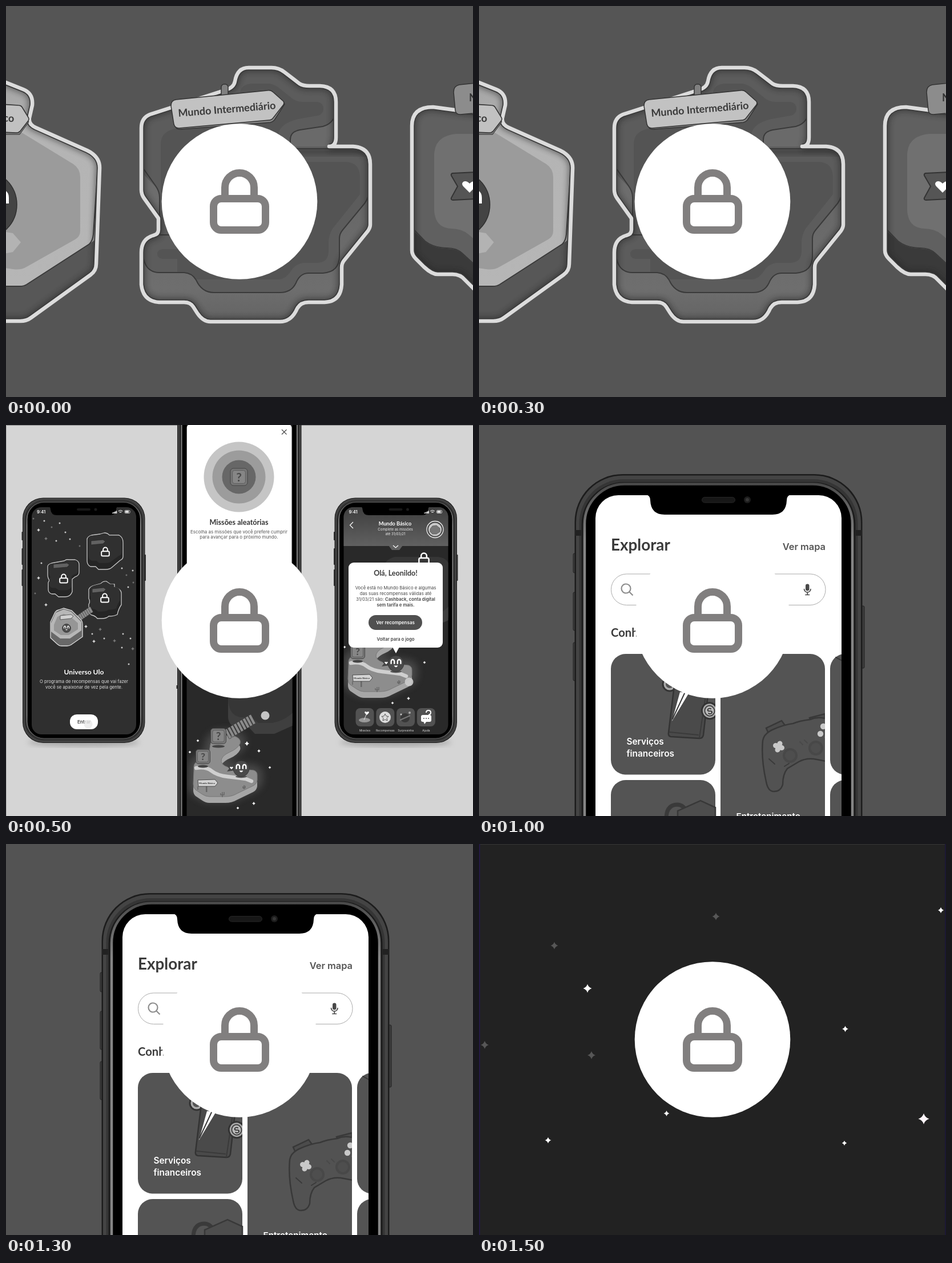
These frames come from a looping animation (818x685 px, 2 s). An HTML page:

```html
<!DOCTYPE html>
<html lang="pt-BR">
<head>
<meta charset="utf-8">
<title>Mundos</title>
<style>
html, body { margin: 0; width: 100%; height: 100%; overflow: hidden; background: #555; }
svg { display: block; width: 818px; height: 685px; }
text { font-family: Inter, "Liberation Sans", sans-serif; }
.h { font-family: Lato, "Open Sans", sans-serif; font-weight: 700; }
.b { font-weight: 600; }
.m { text-anchor: middle; }
.line { fill: none; stroke: #3a3a3a; stroke-width: 2; stroke-linejoin: round; stroke-linecap: round; }
</style>
</head>
<body>
<svg id="stage" viewBox="0 0 818 685" xmlns="http://www.w3.org/2000/svg"></svg>
<script>
const STEP = 500;
const stage = document.getElementById('stage');

const rect = (x, y, w, h, r, fill, more = '') =>
  `<rect x="${x}" y="${y}" width="${w}" height="${h}" rx="${r}" fill="${fill}" ${more}/>`;
const disc = (x, y, r, fill, more = '') => `<circle cx="${x}" cy="${y}" r="${r}" fill="${fill}" ${more}/>`;
const path = (d, fill, more = '') => `<path d="${d}" fill="${fill}" ${more}/>`;
const line = (d, more = '') => `<path class="line" d="${d}" ${more}/>`;
const text = (x, y, size, fill, cls, s, more = '') =>
  `<text x="${x}" y="${y}" font-size="${size}" fill="${fill}" class="${cls}" ${more}>${s}</text>`;

function star(x, y, r, fill) {
  const c = r * 0.24;
  return path(`M${x},${y - r}Q${x + c},${y - c} ${x + r},${y}Q${x + c},${y + c} ${x},${y + r}` +
    `Q${x - c},${y + c} ${x - r},${y}Q${x - c},${y - c} ${x},${y - r}Z`, fill);
}
const stars = (list, fill) => list.map(([x, y, r]) => star(x, y, r, fill)).join('');

const lock = (x, y, k, color) =>
  `<g transform="translate(${x} ${y}) scale(${k})" fill="none" stroke="${color}" stroke-width="13">` +
  `<path d="M-25.5,-5V-24.5a25.5,25.5 0 0 1 51,0V-5"/><rect x="-45.5" y="-5" width="91" height="55" rx="13.5"/></g>`;

const heart = (x, y, s, fill) =>
  `<path transform="translate(${x} ${y}) scale(${s})" fill="${fill}" d="M0,10L-11,-1Q-15,-6 -11,-9Q-6,-12 0,-6Q6,-12 11,-9Q15,-6 11,-1Z"/>`;

// Large island: a light rim, a dark inner line and a soft inner shade.
const island = (id, d, fill, inside) => `
  <clipPath id="${id}"><path d="${d}"/></clipPath>
  <g clip-path="url(#${id})">${path(d, fill)}${inside}
    <path d="${d}" fill="none" stroke="#222" stroke-width="16" opacity=".45" filter="url(#soft)"/>
    <path d="${d}" fill="none" stroke="#3a3a3a" stroke-width="10"/></g>
  <path d="${d}" fill="none" stroke="#dcdcdc" stroke-width="6.5" stroke-linejoin="round"/>`;

function worlds() {
  const mid = 'M237,322V214Q237,196 252,190L385,147Q399,143 401,132Q405,108 425,108H465Q478,108 488,116L514,136Q520,140 532,140H550' +
    'Q578,141 578,168V230Q578,246 566,246H608Q638,248 638,277V383Q638,388 634,394L592,446Q588,451 588,458V488Q586,518 558,519H530' +
    'Q516,519 510,530Q500,553 480,553H358Q345,553 335,538L328,527Q323,519 312,519H268Q240,517 237,488V432Q237,408 258,402' +
    'Q267,400 267,392V372L242,337Q237,330 237,322Z';
  const left = 'M-20,128L0,134L30,146Q48,153 46,174L41,196Q39,207 52,213L142,253Q165,264 164,285L158,452Q158,464 148,471L44,546Q36,552 25,552H-20Z';
  const right = 'M840,188L800,184L748,177Q711,177 711,210V428Q711,436 718,443L732,457Q746,470 756,470H782Q796,470 804,480L840,516V188Z';
  const midTop = 'M240,432Q241,466 268,467H312Q326,468 333,480Q343,502 364,502H480Q500,502 508,485Q515,468 530,468H555Q584,466 584,438' +
    'V407Q584,399 590,392L628,346Q636,336 636,318';
  const midIn = `
    ${path('M230,283L262,317Q269,325 269,335V380L230,330Z', '#6d6d6d')}
    ${path('M578,180Q577,205 555,211L515,217Q498,220 498,236V250H578Z', '#6a6a6a')}
    ${line('M230,270L262,315Q269,325 269,335V395')}${line('M578,180Q577,205 555,211L515,217Q498,220 498,234V250')}
    <rect x="480" y="249" width="170" height="12" fill="#333" opacity=".5" filter="url(#soft)"/>
    ${line('M500,250H620')}
    ${path('M271,340V242Q271,222 292,216L410,180V150Q414,136 432,136H462Q472,138 480,145L500,161Q508,168 520,168H546Q556,170 556,180Q556,192 540,193L512,198Q485,204 478,220L470,330Z', '#545454')}
    ${path('M480,273H596Q620,275 620,300V330L572,390Q565,402 565,415V430Q565,449 545,450H520Q506,452 498,466Q490,478 478,479H300V443H274Q265,442 265,434Q265,427 274,426H480Z', '#545454')}
    ${path(midTop + 'L660,320V570H230V432Z', 'url(#wall)')}${line(midTop)}
    ${line('M241,424Q247,402 268,401H300')}`;
  const leftIn = `
    ${path('M-20,120L60,130V200L170,250L162,395Q160,408 150,414L36,488Q31,491 24,491H-20Z', 'url(#sand)')}
    ${path('M-20,215L28,222L118,277Q130,285 130,300V394Q130,404 121,409L36,457Q26,463 12,461L-20,456Z', '#9b9b9b')}
    ${path('M-20,396H0L12,398L26,414L12,431L-20,437Z', '#b3b3b3')}
    ${line('M161,280L153,400Q152,411 146,417L36,488Q31,491 24,491H-20')}`;
  const rightIn = `
    ${path('M840,224H788Q750,228 750,262V358Q752,389 780,390Q798,390 810,400L840,425Z', '#707070')}
    ${path('M705,385L734,413Q750,425 772,425Q790,425 800,435L840,472V530H700Z', '#3a3a3a')}
    ${line('M705,382L734,412Q750,424 772,424Q790,424 800,434L840,471')}`;
  return rect(0, 0, 818, 685, 0, '#555') +
    island('cl', left, '#575757', leftIn) +
    disc(-41, 348, 60, '#444', 'stroke="#2f2f2f" stroke-width="1.5"') +
    path('M-20,346V334Q-20,322 -7,322Q5,323 5,336V346H0V341Q0,334 -8,334V346Z', '#fff') +
    path('M-10,180L26,181L40,203L24,225H-10Z', '#777', 'stroke="#333"') +
    path('M-10,172L22,174Q26,174 28,177L39,195Q41,198 39,201L25,219Q22,222 18,222L-10,221Z', '#c1c1c1', 'stroke="#333" stroke-width="1.5"') +
    text(14, 203, 18, '#3a3a3a', 'h', 'Mundo Básico', 'text-anchor="end" transform="rotate(2 14 203)"') +
    island('cr', right, '#606060', rightIn) +
    path('M840,290L782,293Q779,294 780,297L791,316L780,336Q779,340 783,340L840,337Z', '#555', 'stroke="#333" stroke-width="2"') +
    heart(812, 317, 1, '#fff') +
    path('M840,133L794,138Q784,140 784,151L787,183Q788,190 796,190L840,186Z', '#8c8c8c', 'stroke="#333" stroke-width="1.5"') +
    text(811, 167, 18, '#333', 'h', 'N') +
    island('cm', mid, '#5c5c5c', midIn) +
    rect(377, 137, 12, 30, 5, '#808080', 'stroke="#333" stroke-width="1.5"') +
    path('M292,176L470,156L488,172L470,200Q467,203 463,204L305,216Q297,216 296,209Z', '#858585', 'stroke="#333" stroke-width="1.5"') +
    path('M298,164L458,148Q464,147 468,151L486,167Q488,170 486,173L468,196Q465,200 460,200L303,214Q296,214 294,207L289,175Q289,165 298,164Z', '#c2c2c2', 'stroke="#333" stroke-width="1.5"') +
    text(302, 194, 18.1, '#3a3a3a', 'h', 'Mundo Intermediário', 'transform="rotate(-4.6 302 194)"');
}

// Phone body from the outer edge inwards; k is its scale.
function shell(x, y, w, h, k) {
  const ring = (inset, top, fill, more) =>
    rect(x + inset * k, y + top * k, w - 2 * inset * k, h - 2 * top * k, (84 - inset * 0.8) * k, fill, more);
  return ring(0, 0, '#1c1c1c') + ring(2.5, 2.5, '#444') + ring(8, 9, '#353535') + ring(12, 14, '#1c1c1c') +
    ring(17.5, 17.5, '#000', `stroke="url(#rim)" stroke-width="${4.5 * k}"`);
}

const status = x => text(x, 155, 7.6, '#fff', 'b', '9:41') +
  [0, 1, 2, 3].map(i => rect(x + 132 + i * 2.2, 153.5 - i, 1.6, 1.5 + i, 0.3, '#fff')).join('') +
  `<path d="M${x + 143},151q3.5,-3 7,0M${x + 144.8},153q1.7,-1.4 3.4,0" fill="none" stroke="#fff" stroke-width="1.2"/>` +
  rect(x + 154, 149.5, 9, 5, 1.4, 'none', 'stroke="#fff" stroke-width=".7"') + rect(x + 155, 150.5, 6, 3, 0.6, '#fff');

function phone(x, id, screen) {
  return `<ellipse cx="${x + 107}" cy="556" rx="98" ry="7" fill="#777" opacity=".5" filter="url(#soft)"/>` +
    [[187, 15], [216, 29], [253, 29]].map(([y, h]) => rect(x - 1.5, y, 3, h, 1, '#333')).join('') + rect(x + 212.5, 227, 3.5, 46, 1, '#333') +
    shell(x, 127.5, 214.5, 429.5, 0.43) +
    `<clipPath id="${id}"><rect x="${x + 16}" y="144" width="183" height="398" rx="17"/></clipPath><g clip-path="url(#${id})">${screen}</g>` +
    path(`M${x + 46},143H${x + 167}Q${x + 164},144 ${x + 164},148Q${x + 163},158 ${x + 153},158H${x + 60}Q${x + 50},158 ${x + 49},148Q${x + 49},144 ${x + 46},143Z`, '#000') +
    rect(x + 95, 146, 24, 4, 2, '#181818') + disc(x + 128, 148, 2.5, '#1b1b1b') + status(x + 25);
}

const mini = (d, lx, ly) => path(d, '#252525', 'stroke="#c8c8c8" stroke-width="1.3" stroke-linejoin="round"') +
  `<path d="${d}" transform="translate(${lx} ${ly - 5}) scale(.92 .8) translate(${-lx} ${-ly})" fill="#303030"/>` + lock(lx, ly, 0.15, '#fff');

const tag = (x, y, w, fill) => path(`M${x},${y}l${w - 4},-2l4,3l-4,4l${4 - w},2Z`, fill, 'stroke="#222" stroke-width=".6"');

function bridge(x, y, dx, dy, n, w) {
  let s = '';
  for (let i = 0; i < n; i++) {
    const u = i / (n - 1);
    s += `<rect x="${-w / 2}" y="-2.4" width="${w}" height="4.8" rx="1" fill="#8b8b8b" stroke="#333" stroke-width=".6" ` +
      `transform="translate(${x + dx * u} ${y + dy * u}) rotate(62)"/>`;
  }
  return s;
}

const box = (x, y, s) => rect(x - s / 2, y - s / 2, s, s, s * 0.18, '#777', 'stroke="#444" stroke-width="1"') +
  rect(x - s * 0.38, y - s * 0.38, s * 0.76, s * 0.76, s * 0.12, '#868686', 'stroke="#555" stroke-width=".8"') +
  text(x, y + s * 0.25, s * 0.7, '#484848', 'h m', '?');

const buddy = (x, y, r) => disc(x, y, r, '#4a4a4a', 'stroke="#2a2a2a" stroke-width=".6"') +
  [-0.4, 0.4].map(k => `<path d="M${x + k * r - r * 0.2},${y + r * 0.05}v${-r * 0.3}a${r * 0.2},${r * 0.25} 0 0 1 ${r * 0.4},0v${r * 0.3}" fill="none" stroke="#fff" stroke-width="${r * 0.17}"/>`).join('') +
  `<path d="M${x - r * 0.25},${y + r * 0.25}q${r * 0.25},${r * 0.4} ${r * 0.5},0" fill="#fff"/>`;

function map() {
  const land = 'M329,606V598Q330,591 337,588L350,581Q357,575 357,566Q358,548 374,544L396,544Q413,548 410,558Q406,567 392,573Q376,580 377,590' +
    'Q380,599 396,601L434,605Q440,607 440,613V622Q439,629 433,632L404,646Q396,651 384,651H356Q350,651 344,647L332,639Q328,635 328,629Z';
  return path('M389,440Q390,420 410,415H486Q506,418 506,435V520L480,536Q474,541 462,541H436L424,528H400Q389,524 389,510Z', '#363636') +
    path('M389,480Q390,508 410,512H430L442,522H466Q490,518 506,500V525L470,541H436L424,528H400Q389,524 389,510Z', '#3f3f3f') +
    lock(461, 418, 0.19, '#fff') +
    `<path d="${land}" fill="#999" stroke="#999" stroke-width="20" opacity=".28" filter="url(#glow)"/>` +
    path(land, '#a6a6a6', 'transform="translate(0 11)"') + path(land, '#8d8d8d', 'stroke="#777" stroke-width="1"') +
    `<path d="M333,601Q350,598 360,606T388,616T420,620L430,624" fill="none" stroke="#cfcfcf" stroke-width="6.5" stroke-linecap="round"/>` +
    bridge(389, 541, 42, -25, 9, 18) +
    '<ellipse cx="345" cy="598" rx="9" ry="2.5" fill="#444"/><ellipse cx="372" cy="563" rx="11" ry="2.5" fill="#444"/>' +
    box(345, 581, 25) + box(372, 545, 27) +
    `<path d="M379,652v-9m-3,2v3h6v-5M417,638v-7m-2,2v3h4v-4M336,639v-6" fill="none" stroke="#5e5e5e" stroke-width="1.2"/>` +
    rect(350, 630, 2.5, 13, 0, '#666') +
    path('M336,622L366,621L371,627L366,633L337,633Z', '#d4d4d4', 'stroke="#333" stroke-width=".8"') +
    text(352, 629, 4.4, '#333', 'h m', 'Mundo Básico') +
    path('M387,597L402,595V605L387,607L391,602Z', '#444') + heart(395, 601, 0.22, '#fff') +
    '<ellipse cx="412" cy="616" rx="10" ry="2.2" fill="#555"/>' + buddy(412, 602, 14) +
    stars([[422, 558, 4], [443, 571, 3], [434, 663, 3], [322, 573, 2.5], [462, 600, 2.5], [336, 553, 2.5], [406, 671, 2.5]], '#fff');
}

function launch() {
  const scatter = [[48, 164, 2], [67, 168, 2], [57, 184, 3], [80, 179, 2], [94, 172, 2], [104, 188, 2], [70, 199, 3], [88, 203, 2], [112, 200, 2], [129, 212, 2],
    [62, 242, 2], [57, 268, 3], [51, 295, 2], [70, 315, 3], [203, 251, 2], [211, 263, 2], [222, 255, 2], [214, 284, 2], [223, 276, 2],
    [140, 353, 3], [151, 366, 2], [165, 358, 3], [172, 374, 2], [154, 379, 3], [190, 378, 3], [205, 366, 2], [218, 374, 2], [222, 392, 3], [203, 390, 2], [215, 419, 2]];
  const home = 'M78,345L86,328Q88,325 92,324L101,321L115,325L131,341Q134,344 134,349V371L114,385Q111,387 107,387H97Q93,387 90,384L78,373Z';
  return rect(40, 140, 195, 410, 0, '#2f2f2f') + stars(scatter.filter((p, i) => i % 3), '#d8d8d8') + stars(scatter.filter((p, i) => i % 3 == 0), '#777') +
    mini('M142,218V200Q143,195 150,193L165,191L172,189Q178,189 181,193H198Q205,197 205,206V230Q205,235 200,237L186,249Q182,253 175,253H162L157,248H148Q142,245 142,238Z', 174, 222) +
    mini('M73,248Q73,244 80,242L102,238Q106,235 110,236H121Q128,238 128,245V258Q128,264 121,266L116,270V292Q113,301 104,301H92L86,296H80Q74,294 74,288V276L76,272Q73,268 73,262Z', 101, 269) +
    mini('M145,288Q147,283 155,281L166,278Q170,273 176,274L183,279H190V285Q202,287 202,295V315Q197,322 195,332Q190,335 180,335Q176,339 168,339H160Q156,334 150,333Q144,330 145,322V314Q148,310 145,304Z', 173, 303) +
    tag(149, 203, 25, '#626262') + tag(83, 244, 28, '#626262') + tag(151, 287, 24, '#626262') +
    bridge(128, 338, 20, -14, 7, 11) + path(home, '#686868', 'stroke="#ddd" stroke-width="1.3"') +
    path('M79,347L87,329L101,323L114,327L132,345V360L112,374H95L79,362Z', '#b7b7b7') +
    path('M84,350L90,336L101,331L112,335L126,347V358L110,368H96L84,360Z', '#969696') + tag(95, 334, 23, '#d0d0d0') + buddy(106, 356, 7.5) +
    text(136.5, 437, 12.1, '#fff', 'h m', 'Universo Ulo') +
    text(136.5, 452, 7.7, '#ddd', 'm', 'O programa de recompensas que vai fazer') +
    text(136.5, 462, 7.7, '#ddd', 'm', 'você se apaixonar de vez pela gente.') +
    rect(112, 507, 49, 26, 12, '#fff') + text(125, 523, 8, '#444', 'b', 'Ent<tspan fill="#bbb">rar</tspan>') + disc(144, 524, 7.5, '#ddd', 'opacity=".5"');
}

function greeting() {
  const body = (y, s, cls = '') => text(682.5, y, 7.75, '#444', 'm ' + cls, s);
  const tools = ['Missões', 'Recompensas', 'Surpresinha', 'Ajuda'];
  return rect(585, 140, 195, 410, 0, '#292929') + `<g transform="translate(271 -184)">${map()}</g>` +
    rect(585, 140, 195, 72, 0, 'url(#bar)') + path('M670,211H695L689,219H676Z', '#606060') +
    '<path d="M608,170l-5.5,5.5l5.5,5.5M678,211l4.5,4l4.5,-4" fill="none" stroke="#fff" stroke-width="1.2"/>' +
    text(681.5, 176, 9.1, '#fff', 'h m', 'Mundo Básico') + text(682, 185, 6.1, '#eee', 'm', 'Complete as missões') + text(682, 193, 6.1, '#eee', 'm', 'até 31/03/21') +
    disc(751.5, 183, 14.5, '#4a4a4a', 'stroke="#eee" stroke-width="1.3"') + disc(751.5, 183, 11.5, '#c9c9c9') +
    path('M743,182l4,-5l7,-1l6,5v6l-6,4h-7l-4,-4Z', '#777', 'stroke="#555" stroke-width=".8"') +
    rect(600, 241, 165, 149, 9, '#fff') + path('M677,389H689L683,400Z', '#fff') +
    text(682.5, 264, 12.5, '#3a3a3a', 'h m', 'Olá, Leonildo!') +
    body(288, 'Você está no Mundo Básico e algumas') + body(298, 'das suas recompensas válidas até') +
    body(307.5, '31/03/21 são: <tspan class="b">Cashback, conta digital</tspan>') + body(317.5, 'sem tarifa e mais.', 'b') +
    rect(635, 333, 94, 26, 13, '#505050') + text(682, 349, 8, '#fff', 'b m', 'Ver recompensas') + text(682.5, 378, 7.75, '#444', 'b m', 'Voltar para o jogo') +
    disc(706, 450, 7.5, '#ccc', 'opacity=".9"') +
    tools.map((s, i) => rect(612.5 + i * 35.8, 496, 32, 32, 8, '#525252') + text(628.5 + i * 35.8, 537, 4.9, '#ddd', 'm', s)).join('') +
    '<ellipse cx="628" cy="517" rx="10" ry="4" fill="#999"/><path d="M627,517l5,-12" stroke="#ddd"/>' + heart(632, 505, 0.3, '#fff') +
    disc(664, 512, 10, '#ddd') + path('M664,506l2,4l4,.5l-3,3l1,4.5l-4,-2l-4,2l1,-4.5l-3,-3l4,-.5Z', 'none', 'stroke="#555"') +
    disc(699, 513, 8, '#383838') + '<path d="M690,517l18,-8" stroke="#777" stroke-width="2"/>' + disc(707, 504, 2, '#aaa') + disc(692, 507, 1.5, '#ccc') +
    rect(727, 508, 18, 12, 3, '#fff') + path('M731,519h6l-4,5Z', '#fff') +
    '<path d="M736,504q0,-4 4,-4t4,4q0,3 -4,4" fill="none" stroke="#fff" stroke-width="2"/>' +
    [732, 736, 740].map(x => disc(x, 514, 1, '#555')).join('');
}

function screens() {
  return rect(0, 0, 818, 685, 0, '#d5d5d5') + rect(0, 0, 818, 1, 0, '#888') + rect(0, 0, 1, 685, 0, '#aaa') +
    phone(29, 'p1', launch()) + phone(575.5, 'p2', greeting()) +
    rect(298.5, 456, 3, 6, 0, '#333') + shell(300, -100, 217.5, 900, 0.432) +
    `<clipPath id="p3"><rect x="316.5" y="-5" width="185" height="700"/></clipPath><g clip-path="url(#p3)">` +
    rect(310, 0, 200, 685, 0, '#292929') + map() + rect(316.5, -1, 184, 330, 6, '#fff') + '</g>' +
    disc(408, 91, 61.5, '#c5c5c5') + disc(408, 91, 46.5, '#9c9c9c') + disc(408, 91, 29.5, '#676767') + box(408, 91, 30) +
    '<path d="M483,8l8.5,8.5m0,-8.5l-8.5,8.5" stroke="#444" stroke-width="1.1"/>' +
    text(408, 175, 12.6, '#333', 'h m', 'Missões aleatórias') +
    text(408, 189.5, 7.9, '#555', 'm', 'Escolha as missões que você prefere cumprir') + text(408, 199, 7.9, '#555', 'm', 'para avançar para o próximo mundo.') +
    disc(454, 509, 7.5, '#ccc', 'opacity=".95"');
}

function explore() {
  const card = (x, y, h) => rect(x, y, 183, h, 26, '#545454');
  return rect(0, 0, 818, 685, 0, '#535353') +
    [[225, 34], [293, 67], [381, 67]].map(([y, h]) => rect(165, y, 6, h, 2, '#3c3c3c', 'stroke="#222"')).join('') + rect(668, 317, 7, 109, 2, '#3c3c3c', 'stroke="#222"') +
    shell(167.5, 86, 504, 1000, 1) + rect(168, 184, 11, 10, 0, '#222') + rect(660, 184, 11, 10, 0, '#222') +
    '<clipPath id="p4"><rect x="204" y="123" width="431" height="640" rx="40"/></clipPath><g clip-path="url(#p4)">' +
    rect(204, 123, 431, 600, 0, '#fff') +
    text(231, 220, 27.8, '#3b3b3b', 'h', 'Explorar') + text(607, 219, 16.4, '#555', 'b', 'Ver mapa', 'text-anchor="end"') +
    rect(231.5, 261, 375.5, 54.5, 27, '#fff', 'stroke="#aaa"') +
    '<g fill="none" stroke="#8d8d8d" stroke-width="2.2"><circle cx="257.5" cy="286.5" r="8"/><path d="M263.5,292.5l6,6"/></g>' +
    rect(572, 278.5, 6.5, 12, 3.2, '#484848') + '<path d="M569.5,287a5.7,6 0 0 0 11.5,0M575.2,293v4.5m-4,0h8" fill="none" stroke="#484848" stroke-width="1.7"/>' +
    text(231, 371, 20.2, '#3b3b3b', 'h', 'Conheça') +
    card(231, 401, 211.5) + card(231, 622, 220) + card(423, 401, 400) + card(615, 401, 211.5) + card(615, 622, 220) +
    '<clipPath id="k1"><rect x="231" y="401" width="183" height="211" rx="26"/></clipPath><g clip-path="url(#k1)">' +
    disc(334, 454, 12, '#aaa', 'stroke="#333" stroke-width="3"') + disc(334, 454, 7, '#555') +
    path('M344,440L404,446L393,543Q392,549 386,549L336,546Q331,545 332,539Z', '#4a4a4a', 'stroke="#333" stroke-width="2.5"') +
    line('M386,548L397,474M334,538L384,543') + path('M352,468L368,469L338,519Z', '#fff') + line('M360,470L339,515') +
    '<g transform="rotate(-18 403 501)"><ellipse cx="404" cy="501" rx="13.5" ry="14" fill="#aaa" stroke="#333" stroke-width="3"/><ellipse cx="404" cy="501" rx="8.5" ry="9" fill="#bbb" stroke="#444" stroke-width="2"/>' +
    text(404, 507, 15, '#333', 'b m', 'S') + '</g></g>' +
    text(258.5, 560, 15.4, '#fff', 'b', 'Serviços') + text(258.5, 580.5, 15.4, '#fff', 'b', 'financeiros') +
    '<clipPath id="k2"><rect x="423" y="401" width="183" height="400" rx="26"/></clipPath><g clip-path="url(#k2)">' +
    path('M503,531L530,518L536,526L507,540Z', '#4c4c4c', 'stroke="#383838" stroke-width="2.5"') + path('M579,513L606,506V520L582,521Z', '#4c4c4c', 'stroke="#383838" stroke-width="2.5"') +
    path('M497,553Q499,540 516,533Q534,525 550,523Q562,518 580,516Q598,508 622,520V592L592,586Q574,582 560,590L540,602Q532,612 532,630Q528,643 515,642Q506,641 503,625Q494,585 497,553Z', '#525252', 'stroke="#383838" stroke-width="2.5"') +
    line('M508,585l10,9M535,598l8,-5') +
    disc(545, 579, 11, '#4e4e4e', 'stroke="#484848" stroke-width="4"') + disc(590, 566, 11, '#4e4e4e', 'stroke="#484848" stroke-width="4"') +
    '<path d="M519.5,561.5l11,4M527,558l-4,11" stroke="#c9c9c9" stroke-width="9" stroke-linecap="round"/>' +
    [[603, 528], [598, 541], [611, 547]].map(([x, y]) => disc(x, y, 5.2, '#c9c9c9')).join('') + line('M562,555l5,5M570,552l5,5', 'opacity=".35"') + '</g>' +
    text(450.5, 690.5, 15.2, '#fff', 'b', 'Entretenimento') +
    '<path d="M328,690Q328,665 348,665Q360,666 364,680" fill="none" stroke="#3a3a3a" stroke-width="7"/>' +
    path('M348,690V676L388,658L414,670V690Z', '#4d4d4d', 'stroke="#383838" stroke-width="2.5"') + line('M625,407L640,415') + '</g>' +
    path('M292,122H547Q539,123 539,132Q538,157 514,157H325Q301,157 300,132Q300,123 292,122Z', '#000') +
    rect(390.5, 126.5, 58, 9.5, 4.7, '#171717', 'stroke="#262626"') + disc(470, 131, 6, '#1d1d1d') + disc(470, 131, 3, '#363636');
}

const sky = () => rect(0, 0, 818, 685, 0, '#222') + rect(0, 0, 818, 1, 0, '#363636') + rect(0, 0, 2, 685, 0, '#241a42') + rect(816, 0, 2, 685, 0, '#1c1834') +
  stars([[132, 178, 6.5], [415, 127, 6.5], [10, 352, 7], [197, 370, 7]], '#575757') +
  stars([[190, 253, 7.5], [809, 116, 5.2], [641.5, 324, 5.5], [328.5, 472, 5], [121, 519, 5.5], [640, 524, 4.2], [525, 276, 4.5]], '#fff') + star(779, 481.5, 9.5, '#fff6fb');

const fade = (id, dir, stops) => `<linearGradient id="${id}" ${dir}>` + stops.map(([o, c]) => `<stop offset="${o}" stop-color="${c}"/>`).join('') + '</linearGradient>';
const down = 'x1="0" y1="0" x2="0" y2="1"';

stage.innerHTML = '<defs>' +
  '<filter id="soft" x="-20%" y="-20%" width="140%" height="140%"><feGaussianBlur stdDeviation="5"/></filter>' +
  '<filter id="glow" x="-30%" y="-30%" width="160%" height="160%"><feGaussianBlur stdDeviation="7"/></filter>' +
  fade('wall', down, [[0, '#666'], [0.7, '#6e6e6e'], [1, '#606060']]) + fade('sand', down, [[0, '#a2a2a2'], [0.3, '#b4b4b4'], [1, '#b6b6b6']]) +
  fade('bar', down, [[0, '#3c3c3c'], [1, '#606060']]) + fade('rim', down, [[0, '#4a4a4a'], [0.1, '#858585'], [0.9, '#858585'], [1, '#4a4a4a']]) + '</defs>' +
  [worlds, screens, explore, sky].map(draw => `<g class="scene">${draw()}</g>`).join('') +
  disc(409, 342.5, 136.3, '#fff') + lock(409, 342.5, 1, '#817f7f');

const scenes = [...document.querySelectorAll('.scene')];

function show(ms) {
  const now = Math.floor(ms / STEP) % scenes.length;
  scenes.forEach((g, i) => { g.style.display = i === now ? 'inline' : 'none'; });
}

function tick() {
  show(performance.now());
  requestAnimationFrame(tick);
}
tick();
</script>
</body>
</html>
```
